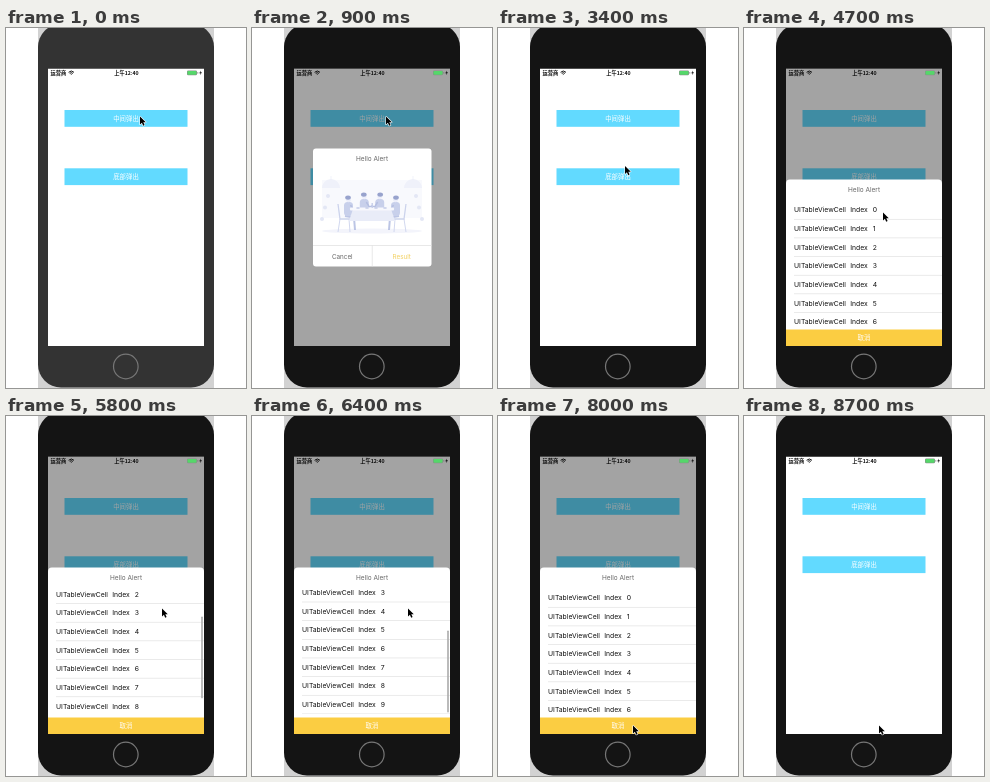
Write an HTML page with a canvas that moves like this. It is 240 by 360 pixels and loops after 8.8 s.

```html
<!DOCTYPE html>
<html lang="zh-CN">
<head>
<meta charset="utf-8">
<title>Popup demo</title>
<style>
html, body { margin: 0; width: 100%; height: 100%; overflow: hidden; background: #fff; }
canvas { display: block; width: 240px; height: 360px; }
</style>
</head>
<body>
<canvas id="stage"></canvas>
<script>
const LOOP = 8800;
const CJK = '"Noto Sans CJK SC", "Noto Sans CJK", sans-serif';
const LATIN = 'Inter, "Liberation Sans", sans-serif';
const canvas = document.getElementById('stage');
const ctx = canvas.getContext('2d');
const dpr = window.devicePixelRatio || 1;
canvas.width = 240 * dpr;
canvas.height = 360 * dpr;

const SCREEN = { x: 42, y: 40.5, w: 156, h: 277.5 };
const LIST = { top: 172.7, bottom: 298, row: 18.65, count: 10 };
const MAX_SCROLL = LIST.count * LIST.row - (LIST.bottom - LIST.top);

// Pointer moves: start, end, x, y
const moves = [
  [0, 1, 134, 88.5],
  [900, 1700, 91, 233],
  [2900, 3400, 127, 138],
  [3450, 3700, 130, 147],
  [4200, 4700, 139, 184.5],
  [4750, 5350, 154, 234],
  [5400, 5800, 156, 192.5],
  [6600, 7300, 155, 271.5],
  [7500, 8000, 135, 309.5]
];

function ramp(t, from, to) {
  const p = Math.min(1, Math.max(0, (t - from) / (to - from)));
  return p * p * (3 - 2 * p);
}

// Rises at `from`, falls at `to`
const pulse = (t, from, to, fade) => ramp(t, from, from + fade) - ramp(t, to, to + fade);

const scrollAt = t => MAX_SCROLL * (ramp(t, 5400, 6050) - ramp(t, 6600, 7590));

function pointerAt(t) {
  let [, , x, y] = moves[0];
  for (const [from, to, nx, ny] of moves) {
    const p = ramp(t, from, to);
    x += (nx - x) * p;
    y += (ny - y) * p;
  }
  return [x, y];
}

function rect(x, y, w, h, color) {
  ctx.fillStyle = color;
  ctx.fillRect(x, y, w, h);
}

function round(x, y, w, h, r, color) {
  ctx.beginPath();
  ctx.roundRect(x, y, w, h, r);
  ctx.fillStyle = color;
  ctx.fill();
}

function oval(x, y, rx, ry, color, from = 0, to = Math.PI * 2) {
  ctx.beginPath();
  ctx.ellipse(x, y, rx, ry, 0, from, to);
  ctx.fillStyle = color;
  ctx.fill();
}

function poly(points, color) {
  ctx.beginPath();
  points.forEach(([x, y]) => ctx.lineTo(x, y));
  ctx.closePath();
  ctx.fillStyle = color;
  ctx.fill();
}

function stroke(points, color, width) {
  ctx.beginPath();
  points.forEach(([x, y]) => ctx.lineTo(x, y));
  ctx.strokeStyle = color;
  ctx.lineWidth = width;
  ctx.stroke();
}

function text(str, x, y, size, color, family = LATIN, align = 'center', weight = 400) {
  ctx.font = `${weight} ${size}px ${family}`;
  ctx.textAlign = align;
  ctx.textBaseline = 'alphabetic';
  ctx.fillStyle = color;
  ctx.fillText(str, x, y + size * 0.36);
}

function drawPhone(t) {
  rect(32, 0, 176, 360, '#d2d2d2');
  round(32, -4, 176, 363.5, 23, t < 100 ? '#333333' : '#141414');
  ctx.beginPath();
  ctx.arc(119.8, 338.5, 12.3, 0, Math.PI * 2);
  ctx.strokeStyle = '#777';
  ctx.lineWidth = 1.2;
  ctx.stroke();
}

function drawStatus() {
  text('运营商', 44.5, 45, 5.2, '#111', CJK, 'left', 700);
  ctx.strokeStyle = '#111';
  ctx.lineWidth = 1;
  for (let r = 0.6; r < 5; r += 1.6) {
    ctx.beginPath();
    ctx.arc(65.3, 47, r, -Math.PI * 0.75, -Math.PI * 0.25);
    ctx.stroke();
  }
  text('上午12:40', 120.5, 45, 5.2, '#111', CJK, 'center', 700);
  poly([[195, 42.4], [193.2, 45.2], [194.5, 45.2], [194, 47.3], [196, 44.3], [194.7, 44.3]], '#222');
}

function drawBattery() {
  round(181, 42.5, 10, 4.7, 1.2, '#8b8b8b');
  round(181.5, 43, 9, 3.7, 0.8, '#55d76a');
  rect(191.5, 44, 0.7, 1.7, '#777');
}

function drawButton(label, y) {
  rect(58.5, y, 123, 16.8, '#62daff');
  text(label, 120, y + 8.5, 6.4, '#fff', CJK);
}

function drawHome() {
  rect(SCREEN.x, SCREEN.y, SCREEN.w, SCREEN.h, '#fff');
  drawStatus();
  drawButton('中间弹出', 82);
  drawButton('底部弹出', 140.3);
}

function person(x, y, side) {
  round(x - 4.5, y + 3, 9, 14, 3.5, '#c8d0eb');
  oval(x, y, 2.5, 3.2, '#eceefa');
  oval(x - side * 0.5, y - 1.4, 2.8, 2.2, '#98a3cd');
  stroke([[x + side * 2, y + 6], [x + side * 5, y + 11], [x + side * 9, y + 10]], '#b5bfe1', 1.5);
}

function drawChair(side) {
  const at = dx => 120 + side * dx;
  stroke([[at(34), 176], [at(32), 191], [at(22), 191]], '#ccd3ec', 1.3);
  stroke([[at(32), 191], [at(34), 204]], '#ccd3ec', 0.9);
  stroke([[at(23), 191], [at(22), 204]], '#ccd3ec', 0.9);
  stroke([[at(27), 188], [at(18), 189.5], [at(17), 202]], '#bcc5e5', 2);
}

function drawDinner() {
  rect(70, 152, 100, 38, '#f8f9fd');
  oval(120, 203, 50, 2.5, '#f3f4fb');
  for (const side of [-1, 1]) {
    const lamp = 120 + side * 41;
    rect(lamp - 0.2, 148, 0.4, 4, '#dde1f3');
    oval(lamp, 160, 9, 9, '#eff1fa', Math.PI, 0);
    for (let i = 0; i < 3; i++) {
      oval(120 + side * (44 + i * 3), 168 + i * 11.5, 2, 2, '#e3e7f5');
    }
    drawChair(side);
    person(120 + side * 7.7, 168, -side);
    person(120 + side * 23.5, 171, -side);
  }
  poly([[101, 181], [139, 181], [143, 193], [97, 193]], '#e9ecf8');
  round(98, 179.5, 44, 3, 1, '#f7f8fd');
  for (let x = 106; x < 140; x += 9) oval(x, 180, 2, 0.8, '#c0c8e6');
  rect(119.5, 175, 1.4, 5, '#c6cee9');
}

function dim(alpha) {
  rect(SCREEN.x, SCREEN.y, SCREEN.w, SCREEN.h, `rgba(0,0,0,${0.36 * alpha})`);
}

function drawAlert(t) {
  const p = pulse(t, 300, 2800, 300);
  if (p <= 0) return;
  dim(p);
  ctx.save();
  ctx.globalAlpha = p;
  round(61, 120.5, 118.5, 118, 3, '#fff');
  text('Hello Alert', 120, 130.5, 6.5, '#666');
  drawDinner();
  rect(61, 217.3, 118.5, 0.7, '#dedede');
  rect(119.8, 217.3, 0.7, 21.2, '#dedede');
  text('Cancel', 90.3, 228.5, 6.3, '#666');
  text('Result', 149.7, 228.5, 6.3, '#f2d060');
  ctx.restore();
}

function drawList(t) {
  const offset = scrollAt(t);
  ctx.save();
  ctx.beginPath();
  ctx.rect(SCREEN.x, LIST.top, SCREEN.w, LIST.bottom - LIST.top);
  ctx.clip();
  for (let i = 0; i < LIST.count; i++) {
    const y = LIST.top + i * LIST.row - offset;
    const put = (str, x) => text(str, x, y + 9.3, 6.8, '#111', LATIN, 'left');
    put('UITableViewCell', 50);
    put('Index', 106.2);
    put(i, 128.8);
    rect(50, y + LIST.row - 0.4, 148, 0.6, '#dcdcdc');
  }
  ctx.globalAlpha = pulse(t, 5300, 7750, 200);
  round(195.2, LIST.top - 1 + offset * 0.7, 1.6, 82, 0.8, '#aaa');
  ctx.restore();
}

function drawSheet(t) {
  const p = pulse(t, 3900, 8200, 350);
  if (p <= 0) return;
  dim(p);
  ctx.save();
  ctx.translate(0, (1 - p) * 167);
  round(42, 151.5, 156, 167, [4, 4, 0, 0], '#fff');
  text('Hello Alert', 120, 162, 6.5, '#666');
  drawList(t);
  rect(42, 301.5, 156, 16.5, '#fbcd42');
  text('取消', 120, 310, 6.4, '#fff', CJK);
  ctx.restore();
}

function drawPointer(t) {
  const arrow = [[0, 0], [0, 8], [1.9, 6.3], [3.2, 9.2], [4.6, 8.6], [3.3, 5.8], [5.8, 5.7]];
  ctx.save();
  ctx.translate(...pointerAt(t));
  ctx.lineJoin = 'round';
  stroke([...arrow, arrow[0]], '#fff', 1.1);
  poly(arrow, '#000');
  ctx.restore();
}

function draw(t) {
  ctx.setTransform(dpr, 0, 0, dpr, 0, 0);
  rect(0, 0, 240, 360, '#fff');
  drawPhone(t);
  ctx.save();
  ctx.beginPath();
  ctx.rect(SCREEN.x, SCREEN.y, SCREEN.w, SCREEN.h);
  ctx.clip();
  drawHome();
  drawAlert(t);
  drawSheet(t);
  drawBattery(); // stays bright above the dimmed screen
  ctx.restore();
  drawPointer(t);
}

const start = performance.now();
function tick() {
  // The picture steps ten times a second
  const t = (performance.now() - start) % LOOP;
  draw(Math.floor(t / 100) * 100);
  requestAnimationFrame(tick);
}
tick();
</script>
</body>
</html>
```
